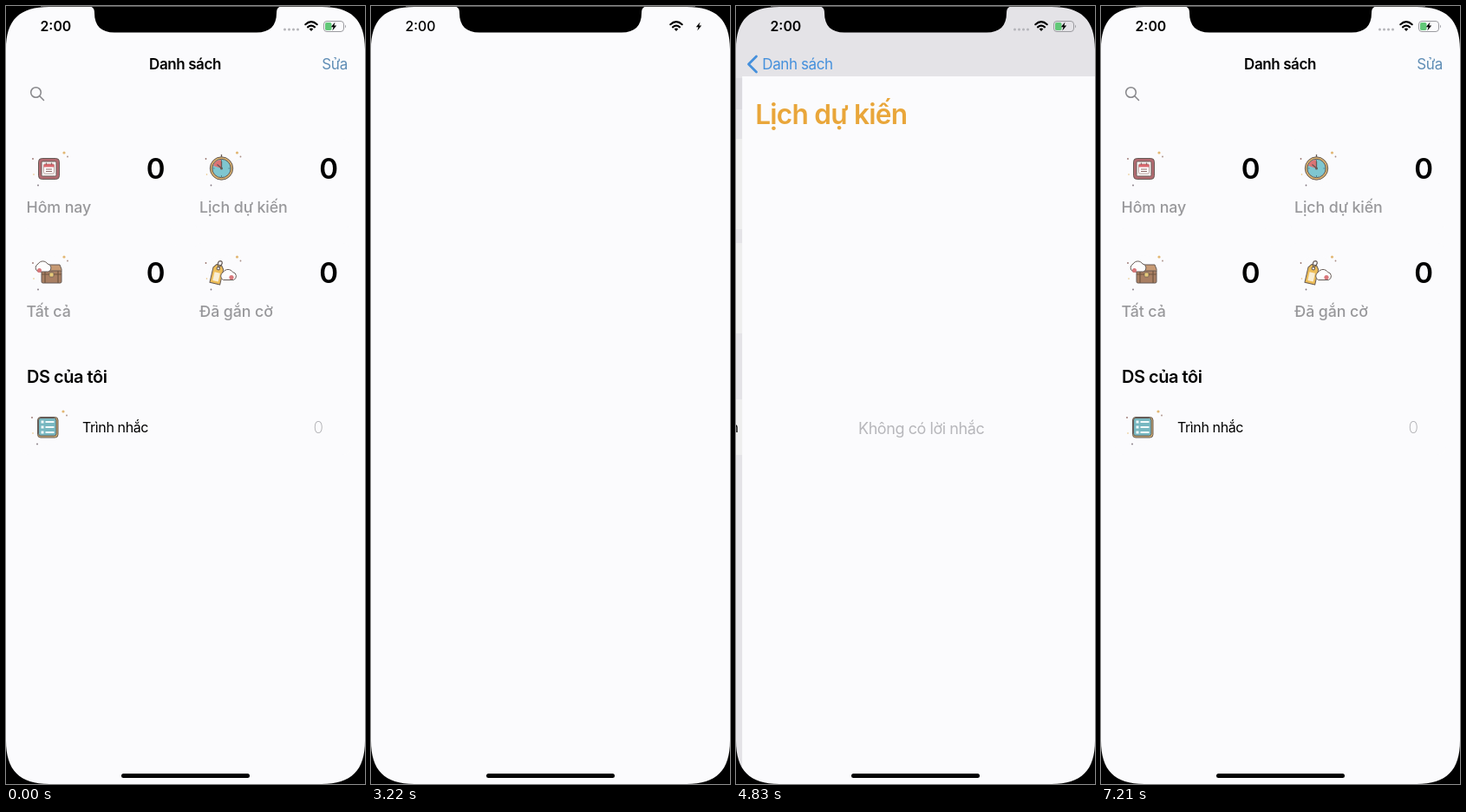
These frames come from a looping animation (414x896 px, 7280 ms). An HTML page:

```html
<!DOCTYPE html>
<html lang="vi">
<head>
<meta charset="utf-8">
<title>Danh sách</title>
<style>
html, body { margin: 0; width: 100%; height: 100%; overflow: hidden; background: #000; }
svg { display: block; width: 100vw; height: 100vh; }
text { font-family: Inter, "Liberation Sans", sans-serif; font-optical-sizing: none; letter-spacing: -.024em; white-space: pre; }
.label { font-size: 17.8px; font-weight: 500; fill: #98989b; letter-spacing: -.005em; }
.count { font-size: 33px; font-weight: 600; text-anchor: end; letter-spacing: 0; }
.head { font-size: 17px; font-weight: 600; text-anchor: middle; }
.link { font-size: 17px; }
.ink { stroke: #665b56; stroke-width: 1; stroke-linejoin: round; }
.line { fill: none; stroke-linecap: round; stroke-linejoin: round; }
</style>
</head>
<body>
<svg viewBox="0 0 414 896">
  <defs>
    <g id="sparks">
      <circle cx="18" cy="-18" r="1.6" fill="#e2b774"/>
      <circle cx="22" cy="-13.500" r=".9" fill="#a98f86"/>
      <circle cx="-18" cy="-11" r=".9" fill="#98736f"/>
      <circle cx="-17" cy="7" r=".8" fill="#e6c07c"/>
      <circle cx="-12" cy="19.500" r=".9" fill="#80757f"/>
    </g>
  </defs>

  <rect id="bg" width="414" height="896"/>
  <g id="list">
    <rect id="field" x="16" y="83" width="382" height="36" rx="10" fill="#ebeaef"/>
    <g class="line" stroke="#86868a" stroke-width="1.500">
      <circle cx="34.500" cy="99.500" r="5.800"/><path d="M38.800 103.800L43.500 108.500"/>
    </g>
    <g id="cards"></g>
    <text x="24" y="434" font-size="20" font-weight="600">DS của tôi</text>
    <rect class="card" x="16" y="453" width="382" height="64" rx="10"/>
    <g id="reminder" transform="translate(48 485)"></g>
    <text x="88" y="491" font-size="16">Trình nhắc</text>
    <text x="365.500" y="492" font-size="19" font-weight="200" fill="#a8a8ac" text-anchor="end">0</text>
  </g>
  <rect id="dim" width="414" height="896"/>

  <g id="page">
    <rect id="sheet" width="414" height="896"/>
    <text id="title" x="15" y="135.500" font-size="31.600" font-weight="600"></text>
    <text x="206.500" y="493" font-size="18" fill="#b7b7bb" text-anchor="middle">Không có lời nhắc</text>
  </g>

  <g id="nav">
    <text id="head" class="head" y="73">Danh sách</text>
    <text id="edit" class="link" x="394" y="73" text-anchor="end">Sửa</text>
    <g id="back" fill="#4590dc">
      <path class="line" d="M23.500 58L14.500 67L23.500 76" stroke="#4590dc" stroke-width="2.800"/>
      <text id="backText" class="link" y="73">Danh sách</text>
    </g>
  </g>

  <path fill="#000" fill-rule="evenodd" d="M0 0H414V896H0ZM50 1C15.700 1 0 15.700 0 50V846C0 880.300 15.700 896 50 896H364C398.300 896 414 880.300 414 846V50C414 15.700 398.300 1 364 1Z"/>
  <path d="M96 0C100 1 102 3 102 8C102 23 110 30.500 125 30.500H289C304 30.500 312 23 312 8C312 3 314 1 318 0Z"/>
  <path d="M40 .5H374" stroke="#555" stroke-width="1"/>
  <text id="clock" x="39.500" y="29" font-size="15.800" style="letter-spacing:0">2:00</text>
  <g class="line" stroke="#000" stroke-width="2.200" stroke-linecap="butt">
    <path d="M345.300 21.200Q352 15.200 358.700 21.200M348 24.300Q352 20.800 356 24.300"/>
  </g>
  <path d="M349.700 26.500Q352 24.500 354.300 26.500L352 29Z"/>
  <g id="status">
    <g fill="#b5b5ba">
      <circle cx="321.500" cy="27" r="1.500"/><circle cx="326.500" cy="27" r="1.500"/>
      <circle cx="331.500" cy="27" r="1.500"/><circle cx="336.500" cy="27" r="1.500"/>
    </g>
    <rect x="366.500" y="17.500" width="23" height="12" rx="3.500" fill="none" stroke="#9b9ba0"/>
    <path d="M391 21.500Q393 23.500 391 25.500Z" fill="#9b9ba0"/>
    <rect x="368" y="19" width="7.500" height="9" rx="1.800" fill="#62c878"/>
  </g>
  <path d="M379.500 18.500L374.800 24.300H377.500L376.300 28.500L381.200 22.500H378.400Z"/>
  <rect x="133" y="884" width="148" height="5" rx="2.500"/>
</svg>

<script>
const $ = id => document.getElementById(id);
const set = (id, attrs) => {
  for (const k in attrs) $(id).setAttribute(k, attrs[k]);
};

// Icons, drawn around their own centre
const icon = art => `<circle class="halo" r="20"/>${art}<use href="#sparks"/>`;

const cloud = (x, y) => `<g transform="translate(${x} ${y})">
  <path class="ink" fill="#fdfdfd" d="M-6 5A5 5 0 0 1-6-4A6.500 6.500 0 0 1 5-4A4.700 4.700 0 0 1 6 5Z"/></g>`;

const rows = [-6, 0, 6].map(y =>
  `<rect x="-7.500" y="${y - 1.5}" width="3" height="3"/><rect x="-2.500" y="${y - 1}" width="10" height="2"/>`).join('');

const art = {
  calendar: `<rect class="ink" x="-11.500" y="-11.500" width="24" height="24" rx="4" fill="#b26a70"/>
    <rect class="ink" x="-8" y="-8" width="17" height="17" rx="1.500" fill="#f7f3f2"/>
    <rect x="-5.500" y="-5" width="12" height="11" rx="1.500" fill="#fff" stroke="#a1817f" stroke-width=".7"/>
    <path d="M-5.500-1.500V-3.500Q-5.500-5-4-5H5Q6.500-5 6.500-3.500V-1.500Z" fill="#d9696f"/>
    <path d="M-2.500-6.500V-4M3.500-6.500V-4M-3 1H4M-3 3.500H4" stroke="#8d6866" stroke-width="1.100"/>`,
  clock: `<circle class="ink" r="13.200" fill="#d9b06c"/><circle class="ink" r="10.700" fill="#7fc6d0"/>
    <path d="M0 0V-10A10 10 0 0 0-9.500-3Z" fill="#dc7475"/>
    <path d="M0-13V-16M0 0L-5-4.500M0 0V-8" stroke="#665b56" stroke-width="1.300"/>
    <path d="M0-10V-8M0 10V8M-10 0H-8M10 0H8" stroke="#4f8389"/><circle r="1.500" fill="#665b56"/>`,
  chest: `<path class="ink" fill="#c79a74" d="M-7-9H13L15-4V-1H-9V-4Z"/>
    <rect class="ink" x="-8" y="-2" width="23" height="14" rx="1.500" fill="#a97f63"/>
    <path d="M-4-2V12M11-2V12M-8 2H15" stroke="#715642" stroke-width="1.200"/>
    <rect x="1" y="0" width="5" height="5" rx="1" fill="#e7c979" stroke="#665b56" stroke-width=".7"/>
    ${cloud(-6, -6)}<circle cx="-10.500" cy="-2.500" r="2.500" fill="#d9777b"/>`,
  tag: `<g transform="translate(-5 1) rotate(13)"><path class="ink" fill="#edbd58" d="M-6-6L-3-10H3L6-6V12H-6Z"/>
      <rect x="-3.300" y="-1" width="6.600" height="10" fill="#f8eed5"/>
      <circle class="ink" cy="-6" r="1.700" fill="#fff"/>
      <path class="line" d="M0-7Q-4-14 1-15Q5-14 1-8" stroke="#665b56" stroke-width="1.200"/></g>
    ${cloud(8, 3.5)}<circle cx="11.500" cy="5.500" r="2.600" fill="#d9777b"/>`,
  notes: `<rect class="ink" x="-11.500" y="-11.500" width="23.500" height="23.500" rx="3.500" fill="#d5b16f"/>
    <rect class="ink" x="-10.500" y="-10.500" width="20.500" height="20.500" rx="2.500" fill="#77b7c0"/>
    <g fill="#f4fafa">${rows}</g>`
};

const cards = [
  ['Hôm nay', 'calendar', 0, 0], ['Lịch dự kiến', 'clock', 199.5, 0],
  ['Tất cả', 'chest', 0, 120], ['Đã gắn cờ', 'tag', 199.5, 120]
];
$('cards').innerHTML = cards.map(([name, pic, x, y]) => `<g transform="translate(${x} ${y})">
  <rect class="card" x="16" y="153" width="183" height="104" rx="10"/>
  <g transform="translate(49 187)">${icon(art[pic])}</g>
  <text class="count" x="183.500" y="199">0</text>
  <text class="label" x="23.500" y="237.500">${name}</text></g>`).join('');
$('reminder').innerHTML = icon(art.notes);

// Screen changes: spring start and direction
const LOOP = 7280, STEP = 70;
const moves = [
  { at: 1647, open: true }, { at: 3257, open: false },
  { at: 4501, open: true }, { at: 6073, open: false }
];
const clamp = v => Math.max(0, Math.min(1, v));
const spring = ms => {
  if (ms <= 0) return 0;
  if (ms > 590) return 1;
  const x = ms * .01826;
  return 1 - (1 + x) * Math.exp(-x);
};
const within = (t, a, b) => t >= a && t < b;

function draw(t) {
  let p = 0, closing = false;
  for (const m of moves) {
    if (t < m.at) break;
    const s = spring(t - m.at);
    p = m.open ? s : 1 - s;
    closing = !m.open;
  }
  const pale = !(within(t, 1540, 3220) || within(t, 4410, 6300));
  const blank = within(t, 3220, 3290);
  const pressed = closing || within(t, 5880, 6073);
  const base = pale ? '#fbfbfd' : '#f4f3f7';
  const show = on => on && !blank ? 'inline' : 'none';

  set('bg', { fill: p === 1 || blank ? '#fbfbfd' : base });
  set('list', { display: show(p < 1), transform: `translate(${-124 * p} 0)` });
  set('dim', { opacity: pale || p === 1 ? 0 : .066 * p });
  set('field', { opacity: pale ? 0 : p });
  document.querySelectorAll('.card').forEach(c => c.setAttribute('fill', pale ? base : '#fff'));
  document.querySelectorAll('.halo').forEach(c => c.setAttribute('fill', base));

  const later = t >= 4000;
  set('page', { display: show(p > 0), transform: `translate(${414 * (1 - p)} 0)` });
  set('sheet', { y: p === 1 ? 0 : 81, fill: p < .4 ? base : '#fbfbfd' });
  set('title', { fill: later ? '#e9a63a' : '#438fe5' });
  $('title').textContent = cards[later ? 1 : 0][0];

  const headShow = clamp(1.3 - 1.6 * p);
  set('nav', { display: show(true) });
  set('head', { x: 206.5 - 92 * p, opacity: headShow });
  set('edit', { fill: pale ? '#5f8db5' : '#4a97d9', opacity: headShow });
  set('back', { opacity: clamp((p - .3) * 1.5) * (pressed ? .25 : 1) });
  set('backText', { x: 28 + 135 * (1 - p) });

  set('status', { display: show(true) });
  set('clock', { 'font-weight': blank ? 500 : 600 });
}

function tick() {
  const t = performance.now() % LOOP;
  draw(Math.floor(t / STEP) * STEP);
  requestAnimationFrame(tick);
}
tick();
</script>
</body>
</html>
```
